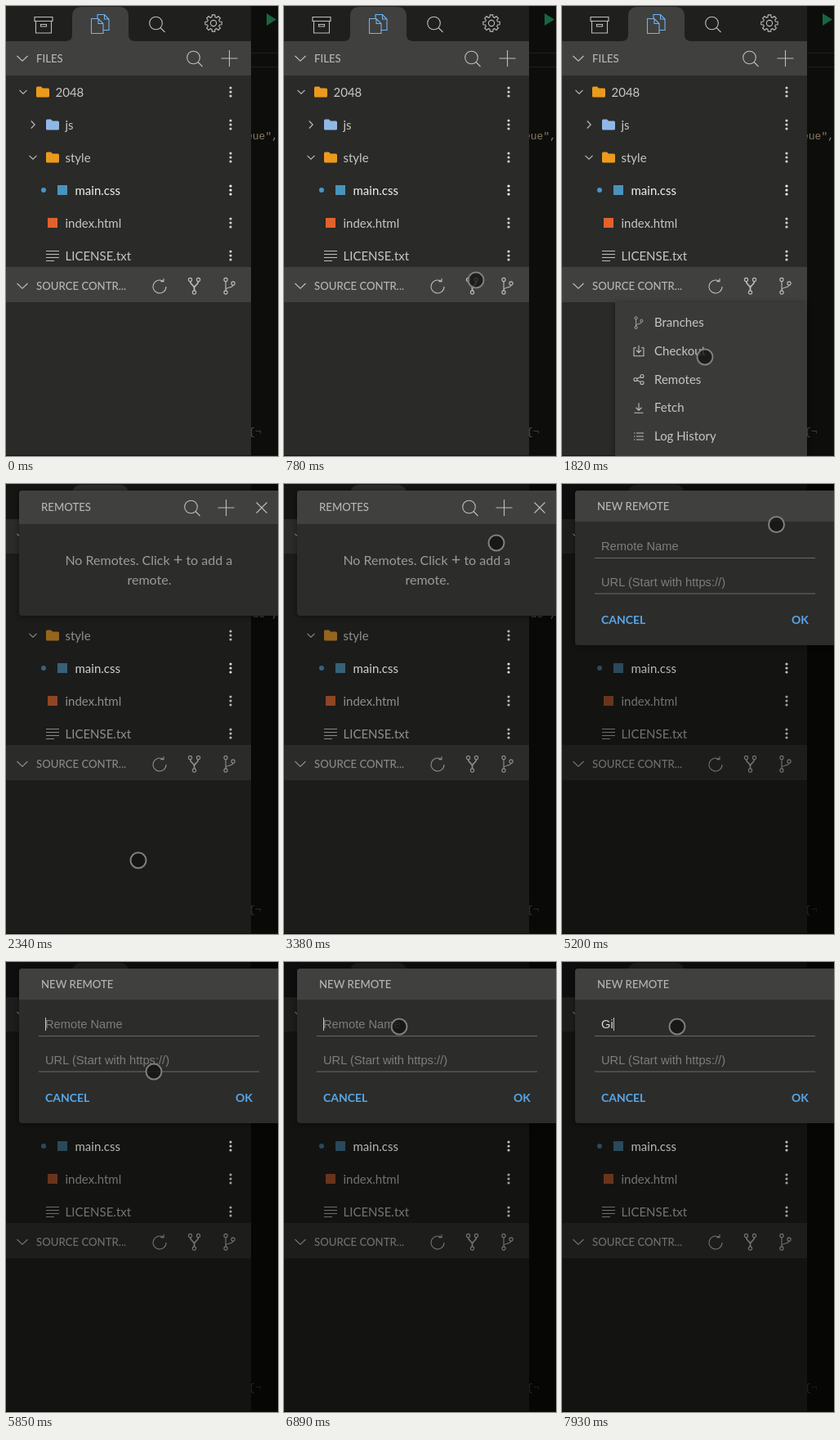
Write an HTML page that moves like this. It is 333 by 550 pixels and loops after 8000 ms.

```html
<!DOCTYPE html>
<html lang="en">
<head>
<meta charset="utf-8">
<title>Adding a remote</title>
<style>
  html, body { margin: 0; width: 100%; height: 100%; overflow: hidden; background: #0d0d0c; }
  svg { display: block; width: 333px; height: 550px; }
  text { font: 15px Lato, sans-serif; fill: #c6c6c4; white-space: pre; }
  .cap { font-size: 13.2px; font-weight: 500; fill: #b4b5b5; }
  .code { font: 13px "Liberation Mono", monospace; fill: #8b7b5c; }
  .msg { font-size: 16px; fill: #9b9b99; text-anchor: middle; }
  .field { font: 14.7px "Liberation Sans", Arial, sans-serif; fill: #7d7d7b; }
  .btn { font-size: 14px; font-weight: 700; fill: #58a6e8; }
  .line { fill: none; stroke: #bebebc; stroke-width: 1.1; }
  .files { stroke: #6fb4f0; }
  .thick { stroke-width: 1.7; }
  .box { filter: drop-shadow(0 1px 3px rgba(0, 0, 0, .45)); }
</style>
</head>
<body>
<svg id="stage" viewBox="0 0 333 550"></svg>
<script>
const stage = document.getElementById('stage');

const text = (x, y, s, cls = '', extra = '') => `<text x="${x}" y="${y}" class="${cls}" ${extra}>${s}</text>`;
const rect = (x, y, w, h, fill, r = 0) => `<rect x="${x}" y="${y}" width="${w}" height="${h}" rx="${r}" fill="${fill}"/>`;
const path = (d, cls = '') => `<path class="line ${cls}" d="${d}"/>`;
const ring = (x, y, r) => `<circle class="line" cx="${x}" cy="${y}" r="${r}"/>`;
const dot = (x, y, r, fill) => `<circle cx="${x}" cy="${y}" r="${r}" fill="${fill}"/>`;
const at = (x, y, body, scale = 1) => `<g transform="translate(${x} ${y}) scale(${scale})">${body}</g>`;
const group = (id, body) => `<g id="${id}">${body}</g>`;

function gearPath() {
  const points = [];
  for (let i = 0; i < 8; i++) {
    for (const [offset, r] of [[-.27, 7.7], [-.17, 10.3], [.17, 10.3], [.27, 7.7]]) {
      const a = i * Math.PI / 4 + offset;
      points.push((r * Math.cos(a)).toFixed(2) + ' ' + (r * Math.sin(a)).toFixed(2));
    }
  }
  return 'M' + points.join('L') + 'Z';
}

const icon = {
  archive: path('M-11 -9.5H11V-4.5H-11ZM-9.5 -4.5V10H9.5V-4.5M-3.5 -.5H3.5V2H-3.5Z'),
  files: path('M-3 -6V-11.5H5.5L11 -6V7.5H4M5.5 -11.5V-6H11M-10.5 -6.5H-2L4 -.5V11.5H-10.5ZM-2 -6.5V-.5H4', 'files'),
  search: ring(-1.5, -1, 7.8) + path('M4 4.5L9.5 10'),
  gear: path(gearPath()) + ring(0, 0, 3.6),
  plus: path('M-9.5 0H10.5M.5 -10V10'),
  close: path('M-6.5 -6.5L6.5 6.5M6.5 -6.5L-6.5 6.5'),
  refresh: path('M8 0A8 8 0 1 1 4 -6.9M5 -10V-6.4H1.4'),
  fork: ring(-5, -7.5, 2.1) + ring(5, -7.5, 2.1) + ring(0, 8, 2.1) +
    path('M-5 -5.4C-5 -1 0 -1 0 2.5V6M5 -5.4C5 -1 0 -1 0 2.5', 'thick'),
  branch: ring(-4.5, -7.5, 2.1) + ring(-4.5, 8, 2.1) + ring(4.5, -3, 2.1) +
    path('M-4.5 -5.4V6M4.5 -1C4.5 3 -4.5 1 -4.5 5'),
  checkout: path('M-3 -4H-6V6H6V-4H3M0 -7V2M-3 -1L0 2L3 -1'),
  share: ring(-4, 0, 2) + ring(4, -4, 2) + ring(4, 4, 2) + path('M-2 -1L2 -3M-2 1L2 3'),
  fetch: path('M0 -6V3M-3.5 -.5L0 3L3.5 -.5M-5.5 6H5.5'),
  list: path('M-3 -4H6M-3 0H6M-3 4H6M-6 -4H-4.5M-6 0H-4.5M-6 4H-4.5'),
  lines: path('M-8 -5.5H8M-8 -1.5H8M-8 2.5H8M-8 6.5H2'),
  down: path('M-4.5 -2.2L0 2.2L4.5 -2.2'),
  wide: path('M-6.5 -3L0 3.2L6.5 -3'),
  right: path('M-2.2 -4.5L2.2 0L-2.2 4.5'),
};
const put = (name, x, y, scale) => at(x, y, icon[name], scale);
const folder = (x, y, fill) => at(x, y, `<path fill="${fill}" d="M-8 -5Q-8 -6.5 -6.5 -6.5H-2L0 -4.5H6.5Q8 -4.5 8 -3V5Q8 6.5 6.5 6.5H-6.5Q-8 6.5 -8 5Z"/>`);
const kebab = (y, fill = '#d2d2d0') => [-5, 0, 5].map(d => dot(275, y + d, 1.6, fill)).join('');

const panels =
  rect(0, 0, 333, 550, '#0d0d0c') +
  rect(300, 57, 33, 1, '#20201f') + rect(300, 74, 33, 1, '#20201f') +
  '<path d="M319 9L331 16.5L319 24Z" fill="#196541"/>' +
  text(294, 163, 'eue"<tspan fill="#85857f">,</tspan>', 'code') +
  text(297, 524, '{<tspan fill="#41413f">¬</tspan>', 'code', 'style="fill:#5c5040"') +
  rect(0, 0, 300, 550, '#2a2a28') + rect(0, 0, 300, 43, '#1f1f1e') +
  '<path d="M73 43Q81 43 81 35V13Q81 1 93 1H138Q150 1 150 13V35Q150 43 158 43Z" fill="#40403e"/>' +
  rect(0, 43, 300, 42, '#40403e') + rect(0, 319, 300, 43, '#40403e') +
  rect(0, 549, 333, 1, '#1b0f18');

const marks =
  folder(45, 105, '#eb9a1c') + folder(57, 145, '#8fb8e8') + folder(57, 185, '#eb9a1c') +
  dot(46, 225, 3, '#4a94c6') + rect(63, 219, 12, 12, '#4a93bd') + rect(51, 259, 12, 12, '#e2622c');

const content =
  put('archive', 46, 23) + put('files', 115, 22) + put('search', 185, 22) + put('gear', 254, 21) +
  put('wide', 20, 64) + text(37, 68.5, 'FILES', 'cap') + put('search', 231, 64) + put('plus', 273, 64) +
  put('down', 21, 105) + text(60.5, 110.5, '2048') +
  put('right', 33, 145) + text(72.5, 150.5, 'js') +
  put('down', 33, 185) + text(72.5, 190.5, 'style') +
  text(72.5, 270.5, 'index.html') +
  put('lines', 57, 305) + text(72.5, 310.5, 'LICENSE.txt') +
  put('wide', 20, 342) + text(37, 346.5, 'SOURCE CONTR...', 'cap') +
  put('refresh', 188, 343) + put('fork', 230.5, 342) + put('branch', 273.5, 342);

const bright =
  text(84.5, 230.5, 'main.css', '', 'style="fill:#f0f0ee"') +
  [105, 145, 185, 265, 305].map(y => kebab(y)).join('') + kebab(225, '#fff');

const entries = [['branch', 'Branches'], ['checkout', 'Checkout'], ['share', 'Remotes'], ['fetch', 'Fetch'], ['list', 'Log History']];
const menu = `<g class="box">${rect(65, 362, 235, 188, '#3a3a38')}</g>` +
  entries.map(([name, label], i) => {
    const y = 387 + i * 34.75;
    return put(name, 94, y, name === 'branch' ? .75 : 1) + text(113, y + 5, label);
  }).join('');

const dialog = (height, head, title) =>
  `<g class="box">${rect(16, 8, 330, height, '#2c2c2a', 4)}</g>` +
  `<path d="M16 ${8 + head}V12Q16 8 20 8H333V${8 + head}Z" fill="#40403f"/>` +
  text(43, 12.5 + head / 2, title, 'cap');

const remotes = dialog(153, 41, 'REMOTES') +
  put('search', 228, 29) + put('plus', 269, 29) + put('close', 313, 29) +
  text(174.8, 99, 'No Remotes. Click <tspan font-size="20">+</tspan> to add a', 'msg') +
  text(175.5, 123, 'remote.', 'msg');

const form = dialog(189, 38, 'NEW REMOTE') +
  text(48, 81, '', 'field', 'id="name"') + text(48, 125, 'URL (Start with https://)', 'field') +
  rect(40, 90, 270, 1, '#6a6a68') + rect(40, 133.5, 270, 1, '#6a6a68') +
  text(48, 171, 'CANCEL', 'btn') + text(281, 171, 'OK', 'btn') +
  '<rect id="caret" y="68" width="1" height="16" fill="#c4c4c2"/>';

stage.innerHTML = panels + '<rect id="dim" width="333" height="550"/>' +
  group('marks', marks) + group('content', content) + group('bright', bright) +
  group('menu', menu) + group('remotes', remotes) + group('form', form) +
  '<circle id="pointer" r="9.5" fill="#131312" fill-opacity=".78" stroke="#80807e" stroke-width="2"/>';

const el = Object.fromEntries([...stage.querySelectorAll('[id]')].map(n => [n.id, n]));
const set = (id, attrs) => { for (const k in attrs) el[id].setAttribute(k, attrs[k]); };

// Pointer route: time, x, y
const route = [
  [130, 272, 318], [520, 246, 329], [780, 235, 335], [910, 232, 342], [1300, 231, 343],
  [1560, 213, 374], [1820, 175, 429], [2080, 163, 456], [2210, 162, 460], [2600, 162, 460],
  [2860, 175, 408], [3120, 213, 240], [3380, 260, 72], [3510, 270, 39], [3640, 271, 37], [5070, 271, 37],
  [5330, 254, 62], [5590, 211, 112], [5850, 181, 134], [6110, 166, 117], [6370, 145, 84], [6500, 141, 79],
];

function position(t) {
  const i = route.findIndex(p => p[0] > t);
  if (i < 0) return route[route.length - 1].slice(1);
  if (i === 0) return route[0].slice(1);
  const [t0, x0, y0] = route[i - 1], [t1, x1, y1] = route[i];
  const k = (t - t0) / (t1 - t0);
  return [x0 + (x1 - x0) * k, y0 + (y1 - y0) * k];
}

const between = (t, a, b) => t >= a && t < b;

function draw(now) {
  const t = Math.floor(now % 8000 / 130) * 130;
  const level = t < 2340 ? 0 : t < 4550 ? 1 : 2;
  set('dim', { opacity: [0, .33, .54][level] });
  set('marks', { opacity: [1, .58, .42][level] });
  set('content', { opacity: [1, .68, .54][level] });
  set('bright', { opacity: [1, .85, .74][level] });
  set('menu', { opacity: between(t, 1040, 2340) ? (t < 1170 ? .6 : 1) : 0 });
  set('remotes', { opacity: level === 1 || t === 4550 ? 1 : 0 });
  set('form', { opacity: level < 2 ? 0 : t === 4550 ? .75 : 1 });

  const typed = t < 7800 ? '' : t < 7930 ? 'G' : 'Gi';
  el.name.textContent = typed || 'Remote Name';
  el.name.style.fill = typed ? '#d8d8d6' : '';
  const blinkOff = between(t, 5200, 5720) || between(t, 6240, 6890) || between(t, 7410, 7800);
  set('caret', {
    x: 48 + (typed ? el.name.getComputedTextLength() + .3 : 0),
    opacity: blinkOff ? 0 : t === 7280 ? .5 : 1,
  });

  const [x, y] = position(t);
  set('pointer', { cx: x, cy: y, opacity: Math.min(1, t / 520) });
  requestAnimationFrame(frame);
}

const start = performance.now();
const frame = () => draw(performance.now() - start);
frame();
</script>
</body>
</html>
```
